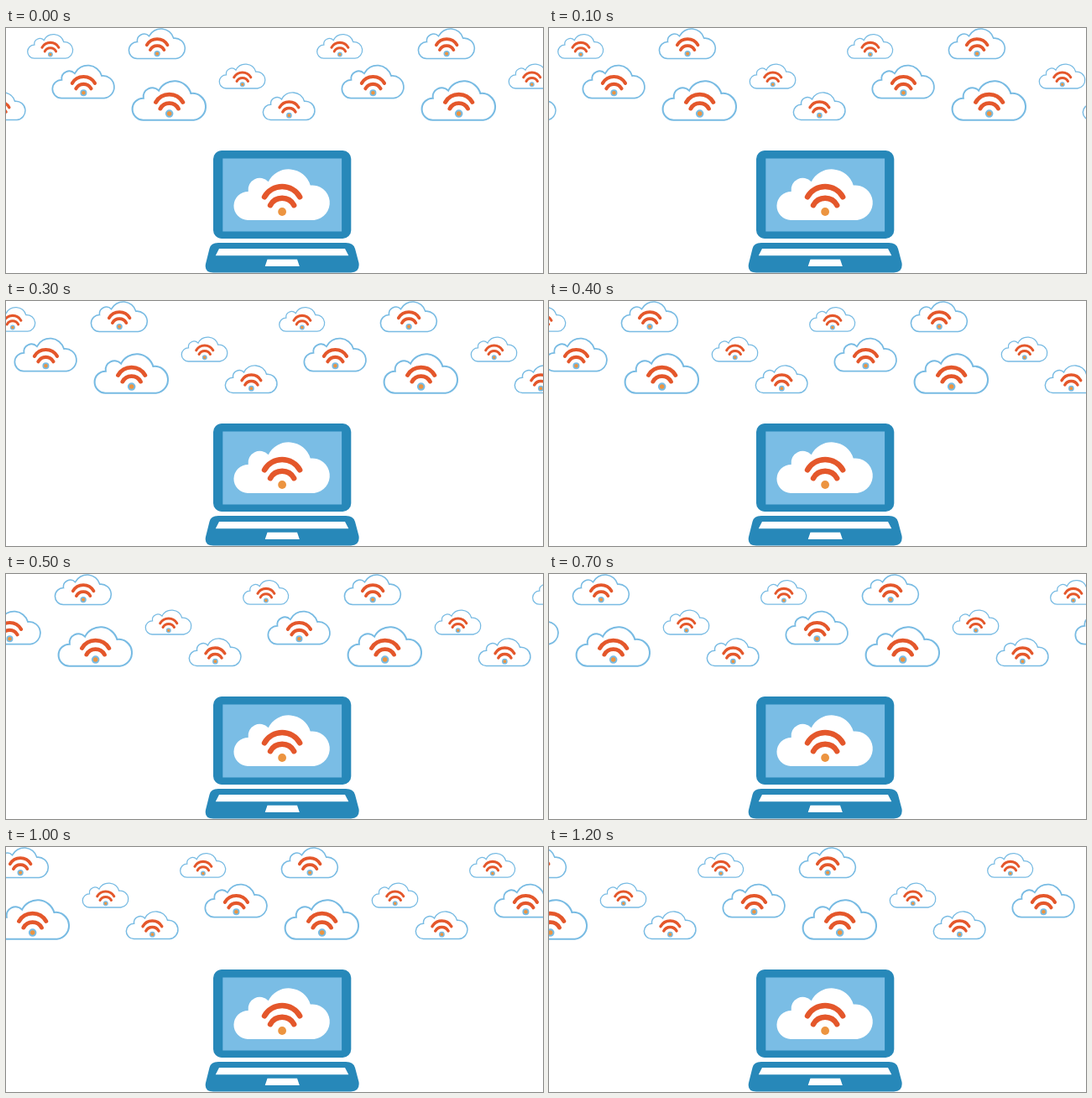
An HTML page that plays this animation: 640x292 px, repeating every 1.3 s.

```html
<!DOCTYPE html>
<html lang="en">
<head>
<meta charset="utf-8">
<title>Clouds over a laptop</title>
<style>
  html, body { margin: 0; width: 100%; height: 100%; overflow: hidden; background: #fff; }
  svg { display: block; width: 640px; height: 292px; }
</style>
</head>
<body>
<svg viewBox="0 0 640 292">
  <defs>
    <path id="cloud" fill="#fff" d="M17.5 61A17 17 0 0 1 18 27A14 14 0 0 1 42 15.2A27 27 0 0 1 92 19.5A20.5 20.5 0 0 1 96.5 61Z"/>
    <g id="signal">
      <path d="M37.3 33.3A24.3 24.3 0 0 1 79.5 33.3M44.3 43.2A16 16 0 0 1 72.5 43.2" fill="none" stroke="#e4572b" stroke-width="6.4" stroke-linecap="round"/>
      <circle cx="58.4" cy="51" r="4.9" fill="#ec9440"/>
    </g>
  </defs>
  <g id="sky" stroke="#78bbe3" stroke-width="2.7"></g>
  <rect x="247" y="146" width="164.3" height="105" rx="10" fill="#2788b9"/>
  <rect x="258.3" y="155.5" width="141.8" height="87" fill="#7abde5"/>
  <g transform="translate(270.7 168)">
    <use href="#cloud"/>
    <use href="#signal"/>
  </g>
  <path fill="#2788b9" d="M253 256H405Q414 256 416 263L420.5 280Q422 291.5 411 291.5H247Q236 291.5 238 281L242.5 263Q244 256 253 256Z"/>
  <path fill="#fff" d="M254 263H404L408.3 271.2H249.8ZM311.5 275.8H347L349.8 284H308.7Z"/>
</svg>
<script>
  const TILE = 345, STEP = 15, FRAME = 100, LOOP = 1300;
  // left, top, width
  const clouds = [
    [24.7, 6.8, 56.5], [145.2, 0, 70], [54, 43.6, 77],
    [149, 62, 91.5], [253.3, 42.3, 57], [305.2, 76, 64.5]
  ];
  const sky = document.getElementById("sky");

  for (let tile = -1; tile <= 2; tile++) {
    for (const [x, y, w] of clouds) {
      const s = w / 119.7, inset = 1.35 * s;
      sky.innerHTML += `<g transform="translate(${x + inset + tile * TILE} ${y + inset}) scale(${s})">
        <use href="#cloud"/><use href="#signal"/></g>`;
    }
  }

  // Even steps, with one longer jump after the fifth pose.
  function draw(now) {
    const i = Math.floor(now % LOOP / FRAME);
    const shift = i * STEP + (i > 4 ? 13 : 0);
    sky.setAttribute("transform", `translate(${-shift} 0)`);
    requestAnimationFrame(draw);
  }
  draw(performance.now());
</script>
</body>
</html>
```
